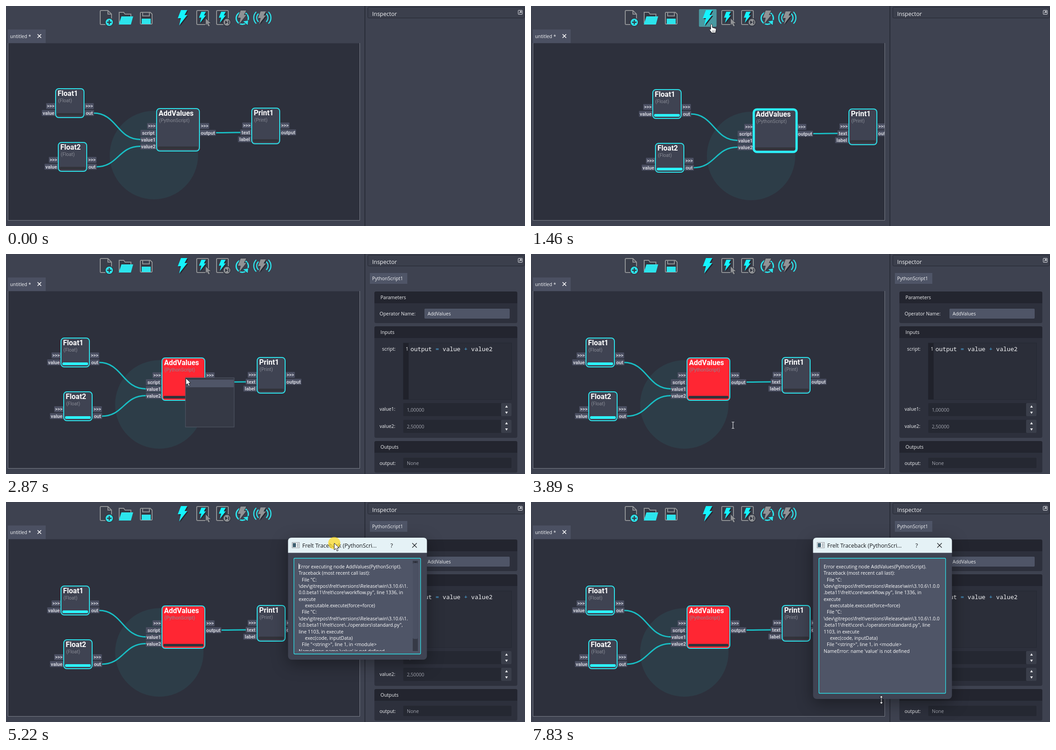
An HTML page that plays this animation: 1151 by 487 pixels, repeating every 7.9 s.

```html
<!DOCTYPE html>
<html lang="en">
<head>
<meta charset="utf-8">
<title>Node editor traceback</title>
<style>
html, body { margin: 0; width: 100%; height: 100%; overflow: hidden; background: #3e4250; }
svg { display: block; width: 1151px; height: 487px; font: 500 10.5px "Open Sans", "Noto Sans", sans-serif; fill: #f4f5f7; }
text { white-space: pre; }
.title { font: bold 16px Roboto, sans-serif; fill: #fff; }
.sub { font: 10.6px Roboto, sans-serif; fill: #888b95; }
.port { font: bold 10.8px Roboto, sans-serif; fill: #d0d2da; text-anchor: middle; }
.code { font: 13.2px "Noto Sans Mono", monospace; }
.dim { fill: #a3a5af; }
.wire { fill: none; stroke: #19bdc3; stroke-width: 3; }
#dialog { filter: drop-shadow(0 9px 18px rgba(0, 0, 0, .38)); }
</style>
</head>
<body>
<svg id="stage" viewBox="0 0 1151 487"></svg>
<script>
const LOOP = 7900, CYAN = '#2ce4ec', BRIGHT = '#2cf2fc', GREY = '#909295', DARK = '#343843';
const stage = document.getElementById('stage');
const $ = id => document.getElementById(id);

const rect = (x, y, w, h, fill, more = '') =>
  `<rect x="${x}" y="${y}" width="${w}" height="${h}" fill="${fill}" ${more}/>`;
const text = (x, y, s, more = '') =>
  `<text x="${x}" y="${y}" ${more}>${s.replace(/</g, '&lt;').replace(/>/g, '&gt;')}</text>`;
const path = (d, fill, more = '') => `<path d="${d}" fill="${fill}" ${more}/>`;
const line = (d, color, width) => path(d, 'none', `stroke="${color}" stroke-width="${width}"`);
const disc = (x, y, r, fill, more = '') => `<circle cx="${x}" cy="${y}" r="${r}" fill="${fill}" ${more}/>`;

// Toolbar
const OUTLINE = `stroke="${GREY}" stroke-width="2"`, CUT = `stroke="${DARK}" stroke-width="2"`;
const bolt = (x, y, k, fill, more = '') =>
  path('M-4-17H10L4-6H10L-8 17L-4 1H-11Z', fill, `transform="translate(${x} ${y}) scale(${k})" ${more}`);
const shade = (x, y, k) => bolt(x + 2, y + 2, k, '#262932');
const page = x => path(`M${x} 12q0-2 2-2h22q2 0 2 2v27q0 2-2 2h-22q-2 0-2-2z`, '#383c48', OUTLINE) +
  shade(x + 13, 25, .7) + bolt(x + 13, 25, .72, '#14f4ff');

function toolbar() {
  return path('M209 12q0-2 2-2h15l8 8v21q0 2-2 2h-21q-2 0-2-2zM226 10v8h8', '#3a3e4a', OUTLINE) +
    disc(229, 36, 9, CYAN, CUT) + line('M229 31v10M224 36h10', DARK, 2.4) +
    path('M251 38V14h10l3 4h13v5', DARK, OUTLINE) + path('M256 23h26l-5 18h-27z', CYAN) +
    path('M298 16q0-2 2-2h20l4 4v20q0 2-2 2h-22q-2 0-2-2zM303 14v8h15v-8', DARK, OUTLINE) +
    rect(301, 28, 20, 12, CYAN) +
    rect(372.5, 7, 39, 39, '#4a99a1', 'id="hover" rx="2"') +
    shade(392, 26, 1) + bolt(392, 26, 1, '#14f4ff') +
    page(423) + path('M443 28v14l3-3 3 6 3-1-3-6h5z', GREY, CUT + ' paint-order="stroke"') +
    page(467) + disc(490, 36, 8.5, GREY, CUT) + path('M486 32l6 4-6 4zM493 32h2v8h-2z', DARK) +
    disc(524, 27, 13.5, 'none', `stroke="${CYAN}" stroke-width="3"`) +
    path('M526 34l11-2-1 10z', CYAN, CUT + ' paint-order="stroke"') +
    bolt(524, 25, .88, GREY, `stroke="${DARK}" stroke-width="3" paint-order="stroke"`) +
    shade(568, 26, .8) + bolt(568, 26, .82, GREY) +
    line('M560 17a12 12 0 0 0 0 18M555 13a18 18 0 0 0 0 26M577 17a12 12 0 0 1 0 18M582 13a18 18 0 0 1 0 26', CYAN, 2.4);
}

// Graph
function port(x, y, w, s) {
  return rect(x, y - 6.5, w, 13, '#4b4f62', 'rx="1"') + text(x + w / 2, y + 3.8, s, 'class="port"');
}
function node(id, x, y, w, h, name, type, ins, outs) {
  const width = s => s === '>>>' ? 20 : s.length * 5.2 + (s.length > 3 ? 3.5 : 5);
  return ins.map((s, i) => port(x - width(s), y + 39.5 + i * 15.2, width(s), s)).join('') +
    outs.map((s, i) => port(x + w + .5, y + 39.5 + i * 15.2, width(s), s)).join('') +
    rect(x + 1, y + 1, w - 2, h - 2, '#3f4352', `id="${id}" rx="7" stroke="${CYAN}" stroke-width="2"`) +
    rect(x + 4, y + h - 11, w - 8, 6, '#32333a', `id="${id}Bar" rx="2.5"`) +
    text(x + 5.5, y + 17.3, name, 'class="title"') +
    text(x + 6.5, y + 30.5, `(${type})`, 'class="sub"');
}
const wire = (x, y, u, v) =>
  `<path class="wire" d="M${x} ${y}C${(x + u) / 2} ${y} ${(x + u) / 2} ${v} ${u} ${v}"/>`;

function graph() {
  const run = '>>>';
  return disc(328, 330, 98, '#2d3d48') +
    wire(194, 237, 298, 295.5) + wire(200, 356, 298, 310.5) + wire(466, 280.5, 522, 280) +
    node('float1', 109, 182, 65, 66, 'Float1', 'Float', [run, 'value'], [run, 'out']) +
    node('float2', 115, 301, 65, 66, 'Float2', 'Float', [run, 'value'], [run, 'out']) +
    node('add', 333, 226, 97, 96, 'AddValues', 'PythonScript', [run, 'script', 'value1', 'value2'], [run, 'output']) +
    node('print', 544, 225, 64, 81, 'Print1', 'Print', [run, 'text', 'label'], [run, 'output']);
}

// Inspector
const group = (y, h, name) =>
  rect(817, y, 317, h, '#2d303c', 'rx="4"') +
  path(`M817 ${y + 26}v-22q0-4 4-4h309q4 0 4 4v22z`, '#23252f') + text(830.5, y + 17, name);
const field = (y, h, s) =>
  rect(881, y, 240, h, '#252832', 'rx="2"') + text(889, y + h / 2 + 4, s, 'class="dim"');
const spin = (y, s) => field(y, 29, s) +
  rect(1098, y, 23, 29, '#3a3e4a', 'rx="2"') +
  path(`M1107 ${y + 10}h6l-3-5zM1107 ${y + 19}h6l-3 5z`, '#e8e9ed');

function inspector() {
  return rect(807, 42, 83, 24, '#4f5567') + text(812, 58, 'PythonScript1') +
    group(83, 70, 'Parameters') + text(828.5, 136, 'Operator Name:') +
    rect(928, 121, 189, 22, '#4f5567', 'rx="2"') + text(935, 136, 'AddValues') +
    group(160, 247, 'Inputs') + text(834, 214, 'script:') +
    rect(881, 197, 240, 125, '#2b2e39', 'stroke="#252832"') + rect(881, 197, 12, 125, '#20222b') +
    text(886.5, 214, '1') +
    '<text class="code" x="897" y="215">output <tspan fill="#4aa5dc">=</tspan> value <tspan fill="#4aa5dc">+</tspan> value2</text>' +
    text(828.5, 347, 'value1:') + spin(330, '1,00000') +
    text(828.5, 385, 'value2:') + spin(367, '2,50000') +
    group(414, 70, 'Outputs') + text(828.5, 467, 'output:') + field(451, 23, 'None');
}

// Traceback dialog, drawn from its own top left corner
const root = String.raw`\dev\gitrepos\frelt\versions\Release\win\3.10.6\1.`;
const core = String.raw`beta11\frelt\core`;
const log = wide => [
  'Error executing node AddValues(PythonScript).', 'Traceback (most recent call last):', ' File "C:',
  root + (wide ? '0.0' : ''), (wide ? '.' : '0.0.') + core + '\\workflow.py", line 1336, in', 'execute',
  '  executable.execute(force=force)', ' File "C:',
  root + (wide ? '0.0' : ''), (wide ? '.' : '0.0.') + core + '\\../operators\\standard.py",' + (wide ? ' line' : ''),
  (wide ? '' : 'line ') + '1103, in execute', '  exec(code, inputData)',
  ' File "<string>", line 1, in <module>', "NameError: name 'value' is not defined"
].map((s, i) => text(23 + 7 * s.search(/\S/), 67 + i * 14.35, s.trim())).join('');

function dialog() {
  return rect(-.5, -1, 308, 270, '#3f4352', 'id="frame" rx="8"') +
    path('M-.5 32.5V7q0-8 8-8h292q8 0 8 8v25.5z', '#e5f2f6') +
    rect(8.5, 9.5, 16, 12, '#fff', 'stroke="#8b9299"') + rect(10, 11, 7, 9, '#3d5f70') + rect(19, 11, 4, 9, '#b9c4ca') +
    text(31, 21, 'Frelt Traceback (PythonScri...', 'style="font-size:12.4px" fill="#15181c"') +
    text(226.5, 21, '?', 'style="font-size:13px" fill="#15181c"') +
    line('M275 11l10 10M285 11l-10 10', '#15181c', 1.2) +
    rect(12.5, 44.5, 281, 212, '#4f5567', `id="box" rx="2" stroke="${CYAN}" stroke-width="1.3"`) +
    '<clipPath id="view"><rect id="viewRect" x="14" y="50" width="278" height="200"/></clipPath>' +
    `<g clip-path="url(#view)" fill="#fff"><g id="narrow">${log(false)}</g><g id="wide">${log(true)}</g></g>` +
    `<g id="bar">${rect(276, 50, 11.5, 200, '#363a47')}${rect(276, 55, 11.5, 168, '#4a5062', 'rx="3"')}` +
    path('M279 55h6l-3-4z', '#2b2e39') + '</g>' + rect(23, 56, 1, 13, '#fff', 'id="caret"');
}

const cursors = {
  arrow: path('M0 0V15L3.5 11.8 6 17.5 8.6 16.3 6.2 10.8H11Z', '#fff', 'stroke="#15171c" stroke-width="1"'),
  hand: path('M-1.5 1.5q1.5-3 3.5 0v6l7 2q2 1 1.5 3l-1.5 7H1L-4 13q-1-3 1.5-2l1 1z', '#fff', 'stroke="#15171c"') +
    line('M3 14v4M6 14v4', '#15171c', .8),
  beam: line('M-3-7h2.3L0-6.2.7-7H3M-3 7h2.3L0 6.2.7 7H3M0-6V6', '#dfe1e6', 1.2),
  size: path('M0-9.5L4-5H1V5H4L0 9.5-4 5H-1V-5H-4Z', '#fff', 'stroke="#15171c" stroke-width="1"')
};

stage.innerHTML =
  rect(0, 0, 1151, 487, '#3e4250') + toolbar() +
  rect(4, 52, 84, 30, '#4b5062') + text(9, 70.5, 'untitled *') + line('M70 62.5l8 8M78 62.5l-8 8', '#fff', 1.7) +
  rect(4.5, 82.5, 780, 392, '#2d303c') +
  `<clipPath id="canvas"><rect x="5" y="83" width="779" height="391"/></clipPath>` +
  `<g clip-path="url(#canvas)"><g id="graph">${graph()}</g></g>` +
  line('M4.5 82V474.5H784.5V82', '#7b7f8a', 1) +
  rect(795, 0, 2, 487, '#292c37') +
  rect(802.5, 2.5, 347, 24, '#3b3f4c', 'stroke="#242731" rx="2"') +
  text(812, 22, 'Inspector', 'style="font-size:12.5px"') +
  rect(1136, 9.5, 9, 9, 'none', 'stroke="#e8e9ed" rx="1"') + line('M1138.5 16l4-4M1139 11.7h3.7v3.7', '#e8e9ed', 1.1) +
  `<g id="inspector">${inspector()}</g>` +
  `<g id="menu">${rect(398, 274, 108, 109, '#353945', 'stroke="#555a68"')}${rect(399, 0, 106, 17, '#4f5567', 'id="row"')}</g>` +
  `<g id="dialog">${dialog()}</g>` +
  `<g id="pointer">${disc(0, 0, 13.5, '#ffd914', 'id="press" opacity=".68"')}` +
  Object.keys(cursors).map(k => `<g id="${k}">${cursors[k]}</g>`).join('') + '</g>';

// Motion tables: time, then values
const PAN = [[990, 0, 0], [1190, 99, -22], [1300, 152, -33], [1440, 172, 2], [1730, 12, 3]];
const POINTER = [
  [70, 1105, 480], [330, 790, 250], [530, 540, 70], [660, 425, 4], [790, 400, 40],
  [1560, 400, 40], [1730, 404, 59], [1930, 411, 195], [2200, 399, 275], [2900, 399, 275],
  [3290, 440, 364], [3490, 440, 364], [3620, 448, 379], [4150, 448, 379], [4560, 453, 161],
  [4890, 452, 161], [5220, 728, 91], [5400, 728, 91], [5820, 779, 371], [6020, 779, 371],
  [6080, 779, 363], [6280, 779, 363], [6350, 779, 352], [6960, 777, 351], [7620, 777, 438]
];
const MOVE = [[4890, 345, 152], [5220, 626, 80]];
const HEIGHT = [[6960, 269], [7620, 356]];
const OPEN = [[3950, 0], [4130, 1]];
const RED = [[1480, 110, 105], [1930, 74, 74], [2200, 38, 51]];
const SHAPE = [
  [0, ''], [70, 'arrow'], [740, 'hand'], [1690, 'arrow'], [3820, 'beam'], [4480, 'arrow'],
  [5460, 'beam'], [5770, 'arrow'], [6020, 'size']
];

function tween(table, t) {
  let i = table.findIndex(k => k[0] > t);
  if (i < 0) i = table.length;
  const a = table[Math.max(i - 1, 0)], b = table[Math.min(i, table.length - 1)];
  const f = a === b ? 0 : (t - a[0]) / (b[0] - a[0]);
  return a.slice(1).map((v, j) => v + (b[j + 1] - v) * f);
}
const between = (t, a, b) => t >= a && t < b;
const show = (id, on) => $(id).style.display = on ? '' : 'none';
const set = (id, values) => { for (const k in values) $(id).setAttribute(k, values[k]); };

function pose(t) {
  set('graph', { transform: `translate(${tween(PAN, t).map(Math.round)})` });
  const active = { float2: [1050, 1280], float1: [1280, 1420], add: [1420, 1480] };
  for (const id in active) {
    const on = between(t, ...active[id]);
    set(id, { stroke: on ? BRIGHT : CYAN, 'stroke-width': on ? 5 : 2 });
    if (id !== 'add') set(id + 'Bar', { fill: t >= active[id][1] ? BRIGHT : '#32333a' });
  }
  if (t >= 1480) {
    const [g, b] = tween(RED, t);
    set('add', { fill: `rgb(255,${g},${b})`, stroke: t < 2540 ? '#ff363c' : CYAN });
  } else set('add', { fill: '#3f4352' });

  const [x, y] = tween(POINTER, t);
  const shape = SHAPE.filter(k => k[0] <= t).pop()[1];
  set('pointer', { transform: `translate(${x} ${y})` });
  for (const k in cursors) show(k, k === shape);
  show('press', between(t, 4620, 5360) || between(t, 6960, 7830));
  show('hover', between(t, 740, 1690));

  show('inspector', t >= 2540);
  show('menu', between(t, 2870, 3820));
  set('row', { y: 278 + 17 * Math.max(0, Math.floor((y - 278) / 17)) });

  const [open] = tween(OPEN, t), [dx, dy] = tween(MOVE, t).map(Math.round), [h] = tween(HEIGHT, t).map(Math.round);
  const k = .9 + .1 * open, wide = h > 275;
  show('dialog', open > 0);
  $('dialog').style.opacity = open;
  set('dialog', { transform: `translate(${dx + 153 * (1 - k)} ${dy + 134 * (1 - k)}) scale(${k})` });
  set('frame', { height: h + 1 });
  set('box', { height: h - 57 });
  set('viewRect', { height: h - 69 });
  show('narrow', !wide);
  show('bar', !wide);
  show('wide', wide);
  show('caret', Math.floor((t - 3940) / 530) % 2 === 0);
}

const start = performance.now();
function tick() {
  pose((performance.now() - start) % LOOP);
  requestAnimationFrame(tick);
}
tick();
</script>
</body>
</html>
```
